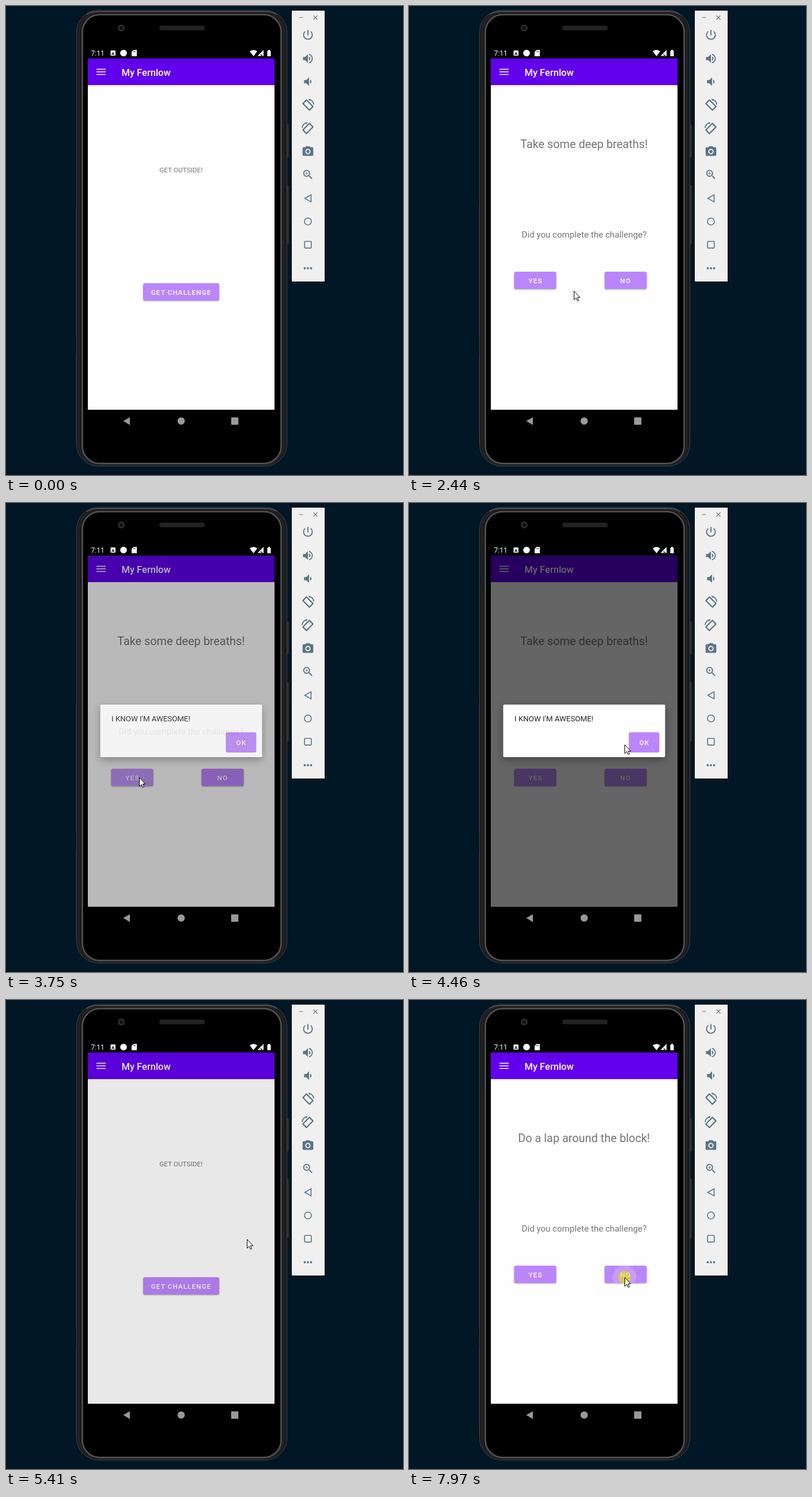
These frames come from a looping animation (689 px wide and 812 px high, 7.99 s). An HTML page:

```html
<!DOCTYPE html>
<html lang="en">
<head>
<meta charset="utf-8">
<title>Phone emulator</title>
<style>
html, body { margin: 0; width: 100%; height: 100%; overflow: hidden; background: #011726; }
svg { display: block; }
text { font: 11.8px Roboto, sans-serif; }
.grey { fill: #757575; }
.mid { text-anchor: middle; }
.big { font-size: 19.84px; }
.ask { font-size: 15.1px; }
.btn rect { fill: #bb86fc; filter: drop-shadow(0 1px 1px #0005); }
.btn text { font-size: 11.7px; font-weight: 500; letter-spacing: 1.1px; fill: #fff; }
.ripple { fill: #fff; }
.line { fill: none; stroke: #5a7583; stroke-width: 1.6; }
</style>
</head>
<body>
<svg width="689" height="812" viewBox="0 0 689 812">
  <defs>
    <clipPath id="clipGet"><rect x="238" y="480" width="132" height="30" rx="3"/></clipPath>
    <clipPath id="clipYes"><rect x="182.5" y="460" width="73" height="30" rx="3"/></clipPath>
    <clipPath id="clipNo"><rect x="339.5" y="460" width="73" height="30" rx="3"/></clipPath>
    <clipPath id="clipOk"><rect x="381.5" y="397" width="53" height="35" rx="3"/></clipPath>
  </defs>

  <!-- phone body -->
  <g fill="#2c2c2e">
    <rect x="486" y="205" width="5" height="57" rx="1"/>
    <rect x="486" y="310" width="5" height="102" rx="1"/>
    <rect x="121.500" y="347" width="3" height="223"/>
    <rect x="121.500" y="605" width="3" height="147"/>
  </g>
  <rect x="122.500" y="7.500" width="365" height="789" rx="38" fill="#19191b" stroke="#454547"/>
  <rect x="127" y="11" width="355" height="782.500" rx="34" fill="none" stroke="#232325" stroke-width="3"/>
  <rect x="132.500" y="15" width="345" height="777" rx="30" stroke="#545456" stroke-width="2.500"/>
  <path d="M140 15Q147 9.500 160 9.500H450Q463 9.500 470 15" fill="none" stroke="#707072"/>
  <circle cx="200" cy="38" r="6" fill="#2b2b2d"/><circle cx="200" cy="38" r="3" fill="#111114"/>
  <rect x="266" y="34" width="79" height="8" rx="4" fill="#222224"/>

  <!-- status bar -->
  <g fill="#fff">
    <text x="147.500" y="86" style="font-size:12px">7:11</text>
    <rect x="181.500" y="77" width="8.500" height="9" rx="1"/>
    <circle cx="204" cy="81.500" r="5.800"/>
    <path d="M221.500 76H227V87H218V79.500Z"/>
    <path d="M429.500 87L423 78.500Q429.500 73.500 436 78.500Z"/>
    <path d="M447 76V86.500H436.500Z"/>
    <path d="M453.500 77.500H455V76H458V77.500H459.500V87H453.500Z"/>
  </g>
  <path d="M222 78v2M224 78v2M442.500 83v2.500h2.500" stroke="#000" fill="none"/>
  <text x="185.800" y="84.500" class="mid" style="font-size:8px;font-weight:700">A</text>

  <!-- app -->
  <rect x="142" y="91" width="324" height="608" fill="#fefefe"/>
  <rect x="142" y="91" width="324" height="46" fill="#6200ee"/>
  <path d="M157 109.500h16M157 114h16M157 118.500h16" stroke="#fff" stroke-width="1.700"/>
  <text x="200.500" y="121" fill="#fff" style="font-size:16.53px;font-weight:500">My Fernlow</text>

  <g id="home">
    <text x="303.700" y="287.500" class="grey mid">GET OUTSIDE!</text>
    <g class="btn">
      <rect x="238" y="480" width="132" height="30" rx="3"/>
      <g clip-path="url(#clipGet)"><circle id="rGet" class="ripple"/></g>
      <text x="251.800" y="499.500">GET CHALLENGE</text>
    </g>
  </g>
  <g id="task">
    <text id="goal" x="303.800" y="246" class="grey mid big"></text>
    <text x="304" y="401" class="grey mid ask">Did you complete the challenge?</text>
    <g class="btn">
      <rect x="182.500" y="460" width="73" height="30" rx="3"/>
      <g clip-path="url(#clipYes)"><circle id="rYes" class="ripple"/></g>
      <text x="207.500" y="479.500">YES</text>
      <rect x="339.500" y="460" width="73" height="30" rx="3"/>
      <g clip-path="url(#clipNo)"><circle id="rNo" class="ripple"/></g>
      <text x="366.500" y="479.500">NO</text>
    </g>
  </g>
  <rect id="dim" x="142" y="91" width="324" height="608"/>
  <g id="dialog">
    <rect x="163.500" y="349" width="281" height="91" rx="2" fill="#fff" style="filter:drop-shadow(0 5px 7px #0005)"/>
    <text x="183" y="378.300" fill="#212121" style="font-size:13.3px">I KNOW I'M AWESOME!</text>
    <g class="btn">
      <rect x="381.500" y="397" width="53" height="35" rx="3" style="filter:none"/>
      <g clip-path="url(#clipOk)"><circle id="rOk" class="ripple"/></g>
      <text x="399.700" y="419.300">OK</text>
    </g>
  </g>

  <!-- navigation bar -->
  <g fill="#999">
    <path d="M203.500 718.500L215 712V725.500Z"/>
    <circle cx="304" cy="718.500" r="6.300"/>
    <rect x="390.700" y="712.300" width="12.600" height="12.600" rx="1"/>
  </g>

  <!-- emulator toolbar -->
  <rect x="495.500" y="7.500" width="58" height="470" stroke="#000"/>
  <rect x="496.500" y="8.500" width="56" height="468" fill="#f0f0f0" stroke="#fff"/>
  <path d="M508.500 20h7M533.500 16.500l7 7M540.500 16.500l-7 7" stroke="#777" stroke-width="1.200"/>
  <g id="tools" fill="#5a7583" fill-rule="evenodd"></g>
  <path class="line" d="M518.500 333L529.500 326.800V339.200Z"/>
  <circle class="line" cx="524" cy="373" r="6"/>
  <rect class="line" x="518.200" y="407.500" width="11.600" height="11.600" rx="1"/>
  <g fill="#5a7583"><circle cx="518.500" cy="454" r="1.900"/><circle cx="524" cy="454" r="1.900"/><circle cx="529.500" cy="454" r="1.900"/></g>

  <circle id="press" r="11" fill="#e6dd07" opacity=".6"/>
  <path id="cursor" d="M.5 .5V15.700L4 12.400L6.400 17.600L8.600 16.600L6.300 11.500H10.800Z" stroke="#000"/>
</svg>
<script>
const $ = id => document.getElementById(id);
const set = (id, attrs) => { for (const k in attrs) $(id).setAttribute(k, attrs[k]); };
const show = (id, on) => set(id, { visibility: on ? 'visible' : 'hidden' });
const clamp = v => Math.min(1, Math.max(0, v));
const LOOP = 7990;

// toolbar icons on a 24 unit grid: centre y, scale x, scale y, path
const turn = 'M12.500 0A12 12 0 0 1 24 11h-2.100A10 10 0 0 0 16.500 3.100l-1.300 1.300zM10.230 1.750c-.590-.590-1.540-.590-2.120 0L1.750 8.110c-.590.590-.590 1.540 0 2.120l12.020 12.020c.590.590 1.540.590 2.120 0l6.360-6.360c.590-.590.590-1.540 0-2.120zM14.830 19.800L4.200 9.170L9.170 4.200L19.800 14.830z';
const icons = [
  [50, .95, .95, 'M13 3h-2v10h2zM17.830 5.170l-1.420 1.420A7 7 0 1 1 7.580 6.580L6.170 5.170A9 9 0 1 0 17.830 5.170z'],
  [91, .95, .95, 'M3 9v6h4l5 5V4L7 9zM16.500 12A4.500 4.500 0 0 0 14 7.970v8.050A4.500 4.500 0 0 0 16.500 12zM14 3.230v2.060a7 7 0 0 1 0 13.420v2.060a9 9 0 0 0 0-17.540z'],
  [131, .95, .95, 'M18.500 12A4.500 4.500 0 0 0 16 7.970v8.050A4.500 4.500 0 0 0 18.500 12zM5 9v6h4l5 5V4L9 9z'],
  [171.500, .92, .92, turn],
  [212, -.92, .92, turn],
  [252, .93, .93, 'M9 2L7.170 4H4a2 2 0 0 0-2 2v12a2 2 0 0 0 2 2h16a2 2 0 0 0 2-2V6a2 2 0 0 0-2-2h-3.170L15 2zM12 7a5 5 0 1 1 0 10a5 5 0 1 1 0-10zM12 9a3 3 0 1 0 0 6a3 3 0 1 0 0-6z'],
  [292, .92, .92, 'M15.500 14h-.790l-.280-.270A6.500 6.500 0 1 0 13.730 14.430l.270.280v.790l5 4.990L20.490 19zM9.500 14a4.500 4.500 0 1 1 0-9a4.500 4.500 0 1 1 0 9zM12 10h-2v2H9v-2H7V9h2V7h1v2h2z']
];
$('tools').innerHTML = icons.map(([y, sx, sy, d]) =>
  `<path transform="translate(524 ${y}) scale(${sx} ${sy}) translate(-12 -12)" d="${d}"/>`).join('');

// pointer moves: start, end, from, bend, to
const moves = [
  [540, 1200, [537, 812], [410, 640], [283, 490]],
  [1490, 1490, [285, 493], [285, 493], [285, 493]],
  [2440, 3110, [286, 493], [262, 511], [231, 475]],
  [4180, 4780, [231, 475], [324, 416], [418, 414]],
  [5640, 6180, [418, 414], [384, 455], [350, 495]],
  [6990, 7380, [350, 495], [362, 487], [374, 480]]
];
const presses = [[1740, 1930], [3490, 3630], [5010, 5240], [6420, 6650], [7820, LOOP]];

// ripples: id, start, release, fade time, x, y, first radius
const ripples = [
  ['rGet', 1745, 1890, 0, 285, 493, 42],
  ['rYes', 3540, 3660, 340, 231, 475, 14],
  ['rOk', 5160, 5450, 0, 418, 414, 14],
  ['rGet', 6565, 6650, 0, 350, 495, 58],
  ['rNo', 7965, LOOP, 0, 374, 480, 19]
];

function pointerAt(t) {
  const [t0, t1, a, b, c] = moves.findLast(m => t >= m[0]) || moves[0];
  const p = t1 > t0 ? clamp((t - t0) / (t1 - t0)) : 1;
  const s = 1 - (1 - p) ** 2.3;
  return a.map((v, i) => Math.round(v * (1 - s) ** 2 + 2 * s * (1 - s) * b[i] + c[i] * s * s));
}

function draw(t) {
  const home = t < 1880 || (t >= 5240 && t < 6630);
  show('home', home);
  show('task', !home);
  $('goal').textContent = t < 5240 ? 'Take some deep breaths!' : 'Do a lap around the block!';

  for (const id of ['rGet', 'rYes', 'rNo', 'rOk']) set(id, { r: 0 });
  for (const [id, start, end, fade, cx, cy, r] of ripples) {
    if (t < start || t > end + fade) continue;
    const left = t > end ? 1 - (t - end) / fade : 1;
    set(id, { cx, cy, r: r + (t - start) * .25, opacity: .18 * left });
  }

  const opening = t < 5240;
  const since = t - (opening ? 3660 : 5240);
  const lit = clamp(since / 200);
  const eased = 1 - (1 - clamp(since / 150)) ** 2;
  const scale = opening ? 1 - .1 * (1 - clamp(since / 150)) ** 5 : 1;
  set('dim', { opacity: .6 * (opening ? lit : 1 - lit) });
  set('dialog', {
    opacity: opening ? eased : 1 - eased,
    transform: `translate(304 395) scale(${scale}) translate(-304 -395)`
  });

  const [x, y] = pointerAt(t);
  const down = presses.some(([a, b]) => t >= a && t < b);
  show('cursor', t >= 540);
  show('press', down);
  set('press', { cx: x, cy: y });
  set('cursor', { transform: `translate(${x} ${y})`, fill: down ? '#ffffb8' : '#fff' });
}

const began = performance.now();
function tick() {
  draw((performance.now() - began) % LOOP);
  requestAnimationFrame(tick);
}
tick();
</script>
</body>
</html>
```
